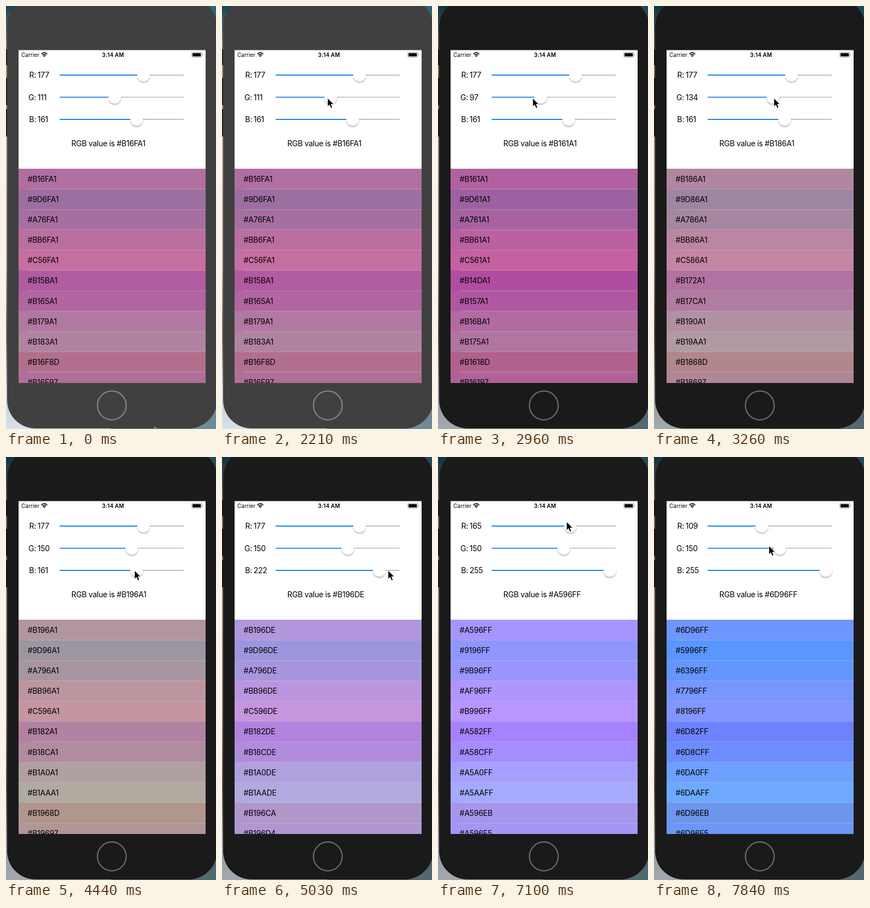
Write an HTML page that moves like this. It is 384x772 px and loops after 7990 ms.

```html
<!DOCTYPE html>
<html lang="en">
<head>
<meta charset="utf-8">
<title>RGB sliders</title>
<style>
  html, body { margin: 0; width: 100%; height: 100%; overflow: hidden; }
  svg { display: block; width: 100vw; height: 100vh; }
  text { font: 14px Inter, "Liberation Sans", sans-serif; letter-spacing: -.22px; }
  #label { letter-spacing: -.28px; }
  .bar text { font-size: 10px; letter-spacing: 0; }
  .bar .clock { font-weight: 600; letter-spacing: .1px; }
</style>
</head>
<body>
<svg id="stage" viewBox="0 0 384 772" xmlns="http://www.w3.org/2000/svg">
  <defs>
    <linearGradient id="left" x2="0" y2="1">
      <stop offset="0" stop-color="#174753"/>
      <stop offset=".1" stop-color="#857a78"/>
      <stop offset=".31" stop-color="#c4bcb6"/>
      <stop offset=".6" stop-color="#b5b2b0"/>
      <stop offset=".78" stop-color="#77716f"/>
      <stop offset=".9" stop-color="#c3ccd2"/>
      <stop offset="1" stop-color="#d6e1e9"/>
    </linearGradient>
    <linearGradient id="right" x2="0" y2="1">
      <stop offset="0" stop-color="#2b6472"/>
      <stop offset="1" stop-color="#6f8c98"/>
    </linearGradient>
    <filter id="soft" x="-50%" y="-50%" width="200%" height="200%">
      <feGaussianBlur stdDeviation="1.5"/>
    </filter>
    <clipPath id="screen"><rect x="23" y="80.5" width="342" height="607.5"/></clipPath>
  </defs>

  <rect width="192" height="772" fill="url(#left)"/>
  <rect x="192" width="192" height="772" fill="url(#right)"/>
  <rect y="79" width="4" height="159" fill="#232326"/>
  <rect y="108" width="4" height="23" fill="#b08b83"/>
  <rect y="181" width="4" height="7" fill="#b79a9c"/>
  <rect id="shade" width="384" height="772"/>
  <rect id="body" x="2" y="-14" width="384" height="785" rx="52"/>
  <circle id="home" cx="193.5" cy="729" r="26.3" fill="none" stroke-width="2.2"/>

  <g clip-path="url(#screen)">
    <rect x="23" y="80" width="342" height="609" fill="#fff"/>
    <g class="bar">
      <text x="28" y="92.6">Carrier</text>
      <g fill="none" stroke="#000" stroke-width="1.7">
        <path d="M64.6 87.6Q70 82.8 75.4 87.6M66.7 89.9Q70 87.1 73.3 89.9"/>
        <path d="M68.2 91.2Q70 89.8 71.8 91.2L70 93.2Z" fill="#000" stroke="none"/>
      </g>
      <text class="clock" x="195.7" y="92.6" text-anchor="middle">3:14 AM</text>
      <rect x="339.5" y="84.5" width="18.5" height="9" rx="2.2" fill="none" stroke="#8e8e8e" stroke-width=".9"/>
      <rect x="341" y="86" width="15.3" height="6" rx="1"/>
      <path d="M359.2 87.3q1.7 1.7 0 3.4z" fill="#8e8e8e"/>
    </g>
    <g id="sliders"></g>
    <text id="label" x="119.5" y="256.3"></text>
    <g id="rows"></g>
  </g>

  <path id="cursor" d="M0 0V16L3.6 12.6L6.2 18.6L9 17.4L6.5 11.4H11.4Z"
        stroke="#fff" stroke-linejoin="round"/>
</svg>

<script>
const LOOP = 7990, START = 1040, STEP = 147.6, SLACK = 12; // ms
const ROW_H = 37.12, LIST_Y = 297, TRACK_X = 98;
const R = 0, G = 1, B = 2;
const $ = id => document.getElementById(id);
const thumbX = v => 109.7 + v * .802;
const hex = rgb => '#' + rgb.map(v => v.toString(16).padStart(2, '0')).join('').toUpperCase();
const clamp = (v, max) => Math.max(0, Math.min(max, v));

function add(parent, tag, attrs) {
  const el = document.createElementNS('http://www.w3.org/2000/svg', tag);
  for (const k in attrs) el.setAttribute(k, attrs[k]);
  return parent.appendChild(el);
}

// Gestures run between two steps; a drag keeps the pointer's height
// and ends with the pointer a little ahead of the thumb.
const smooth = p => p * p * (3 - 2 * p);
const move = (from, to, x, y) => ({ from, to, x, y, ease: smooth });
const drag = (from, to, channel, value, lead) =>
  ({ from, to, channel, value, x: thumbX(value) + lead, ease: p => p });

const gestures = [
  move(-1, 3, 149, 235),
  move(3, 7, 193, 168),
  drag(8, 11, G, 91, -21),
  drag(11, 12, G, 79, -23),
  drag(12, 15, G, 134, 2),
  drag(15, 17, G, 150, 2),
  move(19, 23, 235, 207),
  drag(23, 27, B, 222, 16),
  drag(27, 30, B, 255, 36),
  move(32, 36, 14, 752),
  move(36, 40, 246, 118),
  drag(40, 41, R, 165, -7),
  drag(41, 45, R, 109, -8),
  move(45, 46, 210, 162)
];

function stateAt(step) {
  const s = { x: 272, y: 768, rgb: [177, 111, 161] };
  for (const g of gestures) {
    const p = g.ease(clamp((step - g.from) / (g.to - g.from), 1));
    const mix = (a, b) => a + (b - a) * p;
    s.x = mix(s.x, g.x);
    if ('y' in g) s.y = mix(s.y, g.y);
    else s.rgb[g.channel] = mix(s.rgb[g.channel], g.value);
  }
  s.rgb = s.rgb.map(Math.round);
  return s;
}

const sliders = ['R:', 'G:', 'B:'].map((name, i) => {
  const y = 126.1 + i * 40.4, g = $('sliders');
  add(g, 'text', { x: 55, y: y + 5, 'text-anchor': 'end' }).textContent = name;
  const value = add(g, 'text', { x: 57.7, y: y + 5 });
  const bar = { x: TRACK_X, y: y - .85, width: 227, height: 1.7, rx: .8 };
  add(g, 'rect', { ...bar, fill: '#b7b7b7' });
  const fill = add(g, 'rect', { ...bar, fill: '#007aff' });
  const thumb = add(g, 'g', {});
  add(thumb, 'circle', { cy: y + 2.5, r: 11.3, opacity: .28, filter: 'url(#soft)' });
  add(thumb, 'circle', { cy: y, r: 11.6, fill: '#fff' });
  return { value, fill, thumb };
});

// The chosen colour, then each channel shifted in turn
const shifts = [[R, 0]];
for (const c of [R, G, B]) for (const d of [-20, -10, 10, 20]) shifts.push([c, d]);

const rows = shifts.slice(0, 11).map(([channel, delta], i) => {
  const y = LIST_Y + i * ROW_H;
  const rect = add($('rows'), 'rect', { x: 23, y, width: 342, height: ROW_H + .5 });
  if (i) add($('rows'), 'rect', { x: 40, y: y - .3, width: 325, height: .6, fill: '#c8c7cc', opacity: .7 });
  const text = add($('rows'), 'text', { x: 39.5, y: y + 23.8 });
  return { channel, delta, rect, text };
});

function draw(time) {
  const step = Math.floor((time - START + SLACK) / STEP);
  const { x, y, rgb } = stateAt(step);
  const active = step > 8;
  $('body').setAttribute('fill', active ? '#1a1a1a' : '#404040');
  $('home').setAttribute('stroke', active ? '#6c6c6c' : '#858585');
  $('shade').setAttribute('opacity', active ? .25 : 0);
  $('cursor').setAttribute('transform', `translate(${x} ${y})`);
  $('label').textContent = 'RGB value is ' + hex(rgb);

  sliders.forEach((s, i) => {
    const tx = thumbX(rgb[i]);
    s.value.textContent = rgb[i];
    s.fill.setAttribute('width', tx - TRACK_X);
    s.thumb.setAttribute('transform', `translate(${tx})`);
  });

  for (const r of rows) {
    const color = rgb.slice();
    color[r.channel] = clamp(color[r.channel] + r.delta, 255);
    r.text.textContent = hex(color);
    r.rect.setAttribute('fill', hex(color));
  }
}

function tick() {
  draw(performance.now() % LOOP);
  requestAnimationFrame(tick);
}
tick();
</script>
</body>
</html>
```
